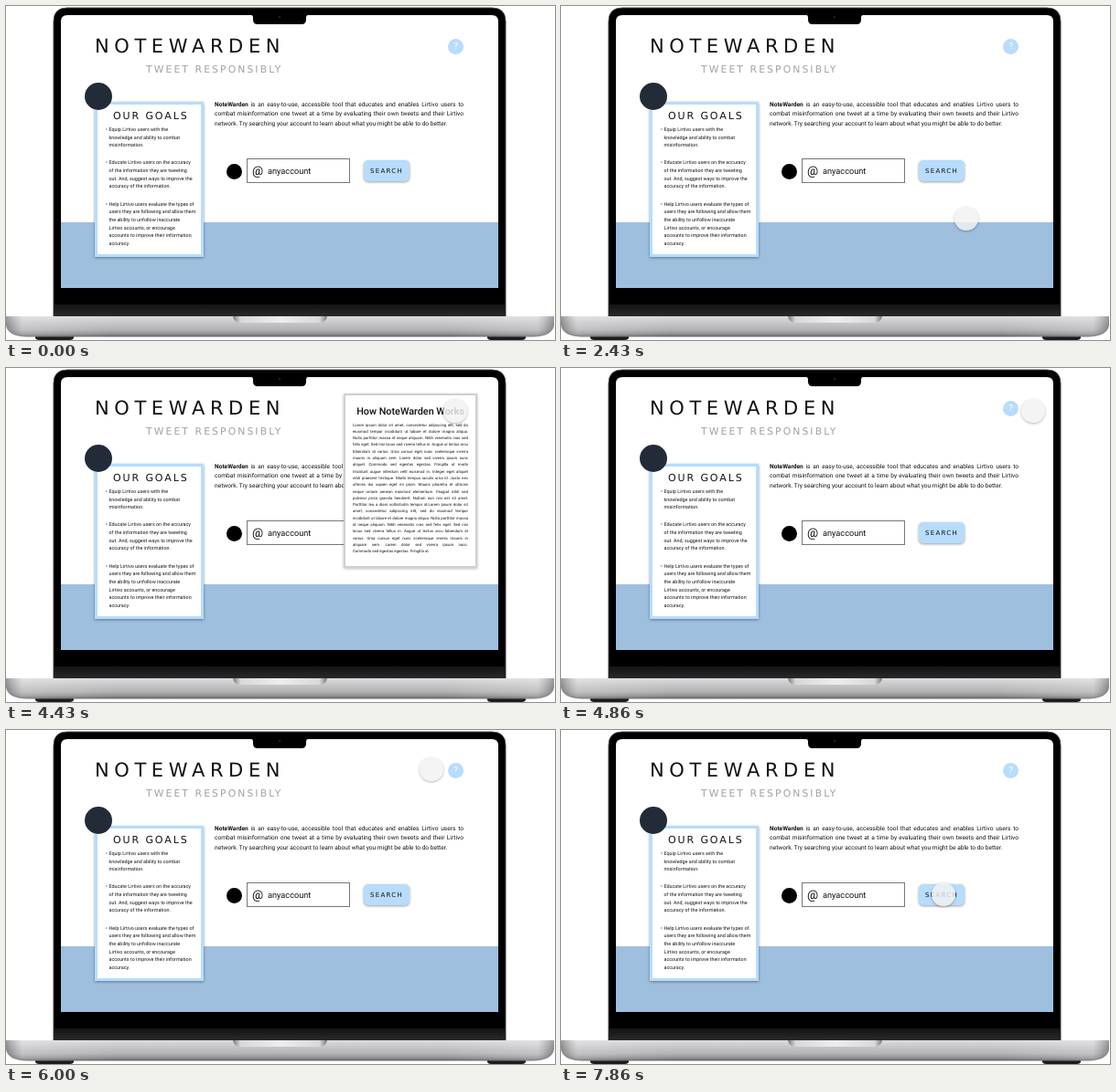
An HTML page that plays this animation: 600x366 px, repeating every 8 s.

```html
<!DOCTYPE html>
<html lang="en">
<head>
<meta charset="utf-8">
<title>NoteWarden</title>
<style>
html, body { margin: 0; width: 100%; height: 100%; overflow: hidden; background: #fff; }
#stage { position: relative; width: 600px; height: 366px; overflow: hidden; color: #111;
  font-family: Roboto, sans-serif; text-rendering: geometricPrecision; }
#stage > * { position: absolute; box-sizing: border-box; white-space: nowrap; }
svg { left: 0; top: 0; }
p { margin: 0 0 10.6px; }
.wide { font-family: "DejaVu Sans", sans-serif; line-height: 20px; }
.justify div { text-align: justify; text-align-last: justify; }
.justify div:last-child { text-align-last: left; }
#title { left: 97px; top: 33.5px; font-size: 21px; letter-spacing: 5.6px; }
#tag { left: 153px; top: 60.4px; font-size: 10.8px; letter-spacing: 2.1px; color: #a2a2a2; }
#intro { left: 228px; top: 102.7px; width: 272px; font-size: 6.6px; line-height: 10.65px; }
#card { left: 97px; top: 105px; width: 119px; height: 170px; background: #fff;
  border: 3px solid #b7dcfd; box-shadow: 0 1px 3px #0006; }
#goals { left: 117px; top: 111px; font-size: 11px; letter-spacing: 1.9px; }
#list { left: 112.5px; top: 131.9px; font-size: 5.4px; line-height: 8.65px; }
#list p { position: relative; }
#list p::before { content: "•"; position: absolute; left: -3.4px; }
#logo { left: 86px; top: 84px; width: 30px; height: 30px; border-radius: 50%; background: #222b37; }
#mark { left: 240.5px; top: 173px; width: 17px; height: 17px; border-radius: 50%; background: #000; }
#field { left: 263px; top: 167px; width: 113px; height: 27px; border: 1px solid #777; background: #fff;
  font-size: 9.2px; line-height: 27px; padding-left: 22px; }
#at { left: 269px; top: 171px; font-size: 13.5px; line-height: 20px; }
#search { left: 391px; top: 169px; width: 50px; height: 22.5px; border-radius: 5px; background: #b7dcfd;
  box-shadow: 0 1px 3px #0006; }
#search-label { left: 398px; top: 170.5px; font-size: 7px; letter-spacing: 1.3px; }
#help { left: 483px; top: 36px; width: 17px; height: 17px; border-radius: 50%; background: #b7dcfd;
  color: #fff; font-size: 10px; line-height: 17px; text-align: center; }
#popup { left: 369px; top: 28px; width: 146px; height: 191px; background: #fff;
  border: 2px solid #d0d0d0; box-shadow: 0 1px 3px #0004; }
#popup h2 { position: absolute; left: 0; right: 0; top: 8px; margin: 0; text-align: center;
  font-size: 10.8px; font-weight: 500; line-height: 20px; }
#lorem { position: absolute; left: 8px; top: 29.6px; width: 126px; font-size: 4.3px; line-height: 7.3px; }
#cursor { left: -13px; top: -13px; width: 26px; height: 26px; border-radius: 50%;
  background: rgba(241,241,241,.82); box-shadow: 0 1px 3px rgba(0,0,0,.3); }
</style>
</head>
<body>
<div id="stage">
  <svg width="600" height="366">
    <defs>
      <linearGradient id="metal" x2="0" y2="1">
        <stop offset="0" stop-color="#dcdcde"/><stop offset=".3" stop-color="#c8c8ca"/>
        <stop offset=".65" stop-color="#b3b3b6"/><stop offset=".85" stop-color="#939396"/>
        <stop offset="1" stop-color="#5f5f62"/>
      </linearGradient>
      <linearGradient id="sides">
        <stop offset="0" stop-color="#000" stop-opacity=".3"/><stop offset=".03" stop-color="#fff" stop-opacity=".2"/>
        <stop offset=".2" stop-color="#fff" stop-opacity="0"/><stop offset=".8" stop-color="#fff" stop-opacity="0"/>
        <stop offset=".97" stop-color="#fff" stop-opacity=".2"/><stop offset="1" stop-color="#000" stop-opacity=".3"/>
      </linearGradient>
      <linearGradient id="scoop">
        <stop offset="0" stop-color="#777"/><stop offset=".08" stop-color="#d8d8da"/>
        <stop offset=".5" stop-color="#ededee"/><stop offset=".92" stop-color="#d8d8da"/>
        <stop offset="1" stop-color="#777"/>
      </linearGradient>
      <linearGradient id="chin" x2="0" y2="1">
        <stop offset="0" stop-color="#141414"/><stop offset="1" stop-color="#292929"/>
      </linearGradient>
      <path id="base" d="M0 340H599V350Q597 362 576 362.5H23Q2 362 0 350Z"/>
    </defs>
    <path d="M32 361H74V364Q73 366 70 366H36Q33 366 32 364ZM526 361H568V364Q567 366 564 366H530Q527 366 526 364Z" fill="#1c1c1c"/>
    <path d="M52 340V17Q52 2 67 2H531Q546 2 546 17V340Z" fill="#000" stroke="#444"/>
    <rect x="53" y="327" width="492" height="13" fill="url(#chin)"/>
    <path d="M60 309V17Q60 10 67 10H531Q538 10 538 17V309Z" fill="#fff"/>
    <rect x="60" y="237" width="478" height="72" fill="#9fbfdf"/>
    <path d="M268 10H330Q328 10 328 13V15Q328 20 323 20H275Q270 20 270 15V13Q270 10 268 10Z" fill="#000"/>
    <circle cx="299" cy="12" r="1.3" fill="#16202c"/>
    <use href="#base" fill="url(#metal)"/>
    <use href="#base" fill="url(#sides)"/>
    <path d="M248 340H351Q350 347 342 347H257Q249 347 248 340Z" fill="url(#scoop)"/>
  </svg>

  <div id="title" class="wide">NOTEWARDEN</div>
  <div id="tag" class="wide">TWEET RESPONSIBLY</div>
  <div id="help">?</div>
  <div id="intro" class="justify">
    <div><b>NoteWarden</b> is an easy-to-use, accessible tool that educates and enables Lirtivo users to</div>
    <div>combat misinformation one tweet at a time by evaluating their own tweets and their Lirtivo</div>
    <div>network. Try searching your account to learn about what you might be able to do better.</div>
  </div>

  <div id="card"></div>
  <div id="logo"></div>
  <div id="goals" class="wide">OUR GOALS</div>
  <div id="list">
    <p>Equip Lirtivo users with the<br>knowledge and ability to combat<br>misinformation.</p>
    <p>Educate Lirtivo users on the accuracy<br>of the information they are tweeting<br>out. And, suggest ways to improve the<br>accuracy of the information.</p>
    <p>Help Lirtivo users evaluate the types of<br>users they are following and allow them<br>the ability to unfollow inaccurate<br>Lirtivo accounts, or encourage<br>accounts to improve their information<br>accuracy.</p>
  </div>

  <div id="mark"></div>
  <div id="field">anyaccount</div>
  <div id="at">@</div>
  <div id="search"></div>
  <div id="search-label" class="wide">SEARCH</div>

  <div id="popup">
    <h2>How NoteWarden Works</h2>
    <div id="lorem" class="justify"></div>
  </div>
  <div id="cursor"></div>
</div>
<script>
const $ = id => document.getElementById(id);

$("lorem").innerHTML = `Lorem ipsum dolor sit amet, consectetur adipiscing elit, sed do
eiusmod tempor incididunt ut labore et dolore magna aliqua.
Nulla porttitor massa id neque aliquam. Nibh venenatis cras sed
felis eget. Sed nisi lacus sed viverra tellus in. Augue ut lectus arcu
bibendum at varius. Urna cursus eget nunc scelerisque viverra
mauris in aliquam sem. Lorem dolor sed viverra ipsum nunc
aliquet. Commodo sed egestas egestas. Fringilla ut morbi
tincidunt augue interdum velit euismod in. Integer eget aliquet
nibh praesent tristique. Morbi tempus iaculis urna id. Justo nec
ultrices dui sapien eget mi proin. Mauris pharetra et ultrices
neque ornare aenean euismod elementum. Feugiat nibh sed
pulvinar proin gravida hendrerit. Nullam non nisi est sit amet.
Porttitor leo a diam sollicitudin tempor id.Lorem ipsum dolor sit
amet, consectetur adipiscing elit, sed do eiusmod tempor
incididunt ut labore et dolore magna aliqua. Nulla porttitor massa
id neque aliquam. Nibh venenatis cras sed felis eget. Sed nisi
lacus sed viverra tellus in. Augue ut lectus arcu bibendum at
varius. Urna cursus eget nunc scelerisque viverra mauris in
aliquam sem. Lorem dolor sed viverra ipsum nunc.
Commodo sed egestas egestas. Fringilla ut.`
  .split("\n").map(line => `<div>${line}</div>`).join("");

// Cursor path: [tick, x, y], seven ticks per second
const path = [
  [10, 508, 322], [12, 478, 260], [14, 448, 233], [16, 448, 233],
  [17, 443, 233], [18, 447, 212], [20, 478, 95], [21, 487, 60], [22, 489, 49], [23, 491, 47],
  [31, 491, 47], [32, 500, 46], [33, 514, 46], [34, 516, 47], [36, 494, 45],
  [39, 494, 45], [40, 487, 45], [41, 474, 43], [42, 465, 43], [43, 456, 72], [45, 424, 187], [46, 420, 203],
  [47, 420, 203], [51, 416, 190], [54, 419, 180], [55, 418, 180], [56, 418, 180]
];

function position(tick) {
  const i = path.findIndex(key => key[0] > tick);
  if (i < 1) return null;
  const [t0, x0, y0] = path[i - 1], [t1, x1, y1] = path[i];
  const k = (tick - t0) / (t1 - t0);
  return [x0 + (x1 - x0) * k, y0 + (y1 - y0) * k];
}

function draw(now) {
  const tick = Math.floor(now % 8000 * .007 + .02) % 56;
  const at = position(tick);
  const hover = at && Math.hypot(at[0] - 491, at[1] - 44) < 11;
  $("cursor").style.display = at ? "block" : "none";
  $("popup").style.display = hover ? "block" : "none";
  if (at) $("cursor").style.transform = `translate(${at[0]}px, ${at[1]}px)`;
  requestAnimationFrame(draw);
}
draw(performance.now());
</script>
</body>
</html>
```
